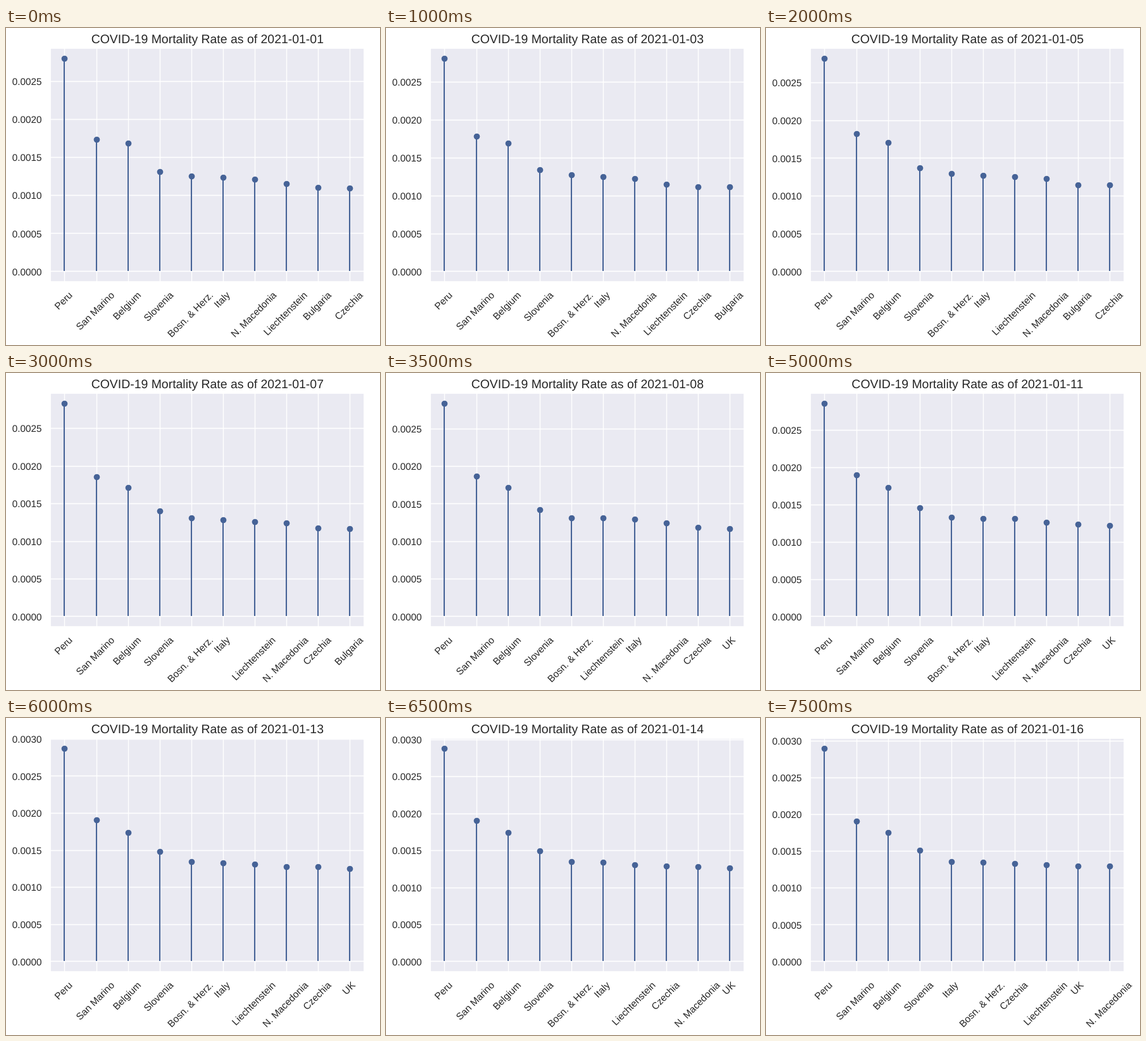
Write an HTML page that moves like this. It is 591 px wide and 501 px high and loops after 8 s.

```html
<!DOCTYPE html>
<html lang="en">
<head>
<meta charset="utf-8">
<title>Mortality rate ranking</title>
<style>
  html, body { margin: 0; width: 100%; height: 100%; overflow: hidden; background: #fff; }
  svg { display: block; }
  text { font: 15.28px "Liberation Sans", Arial, sans-serif; fill: #262626; text-rendering: geometricPrecision; }
  #title { font-size: 19.44px; text-anchor: middle; }
  .tick { text-anchor: end; }
  .name { text-anchor: middle; }
  .grid { stroke: #fff; stroke-width: 1.39; }
  .stem { stroke: #466397; stroke-width: 2.08; }
  .dot { fill: #466397; }
</style>
</head>
<body>
<svg width="591" height="501" viewBox="0 0 591 501">
  <rect x="70" y="32" width="496" height="369" fill="#eaeaf2"/>
  <g id="plot"></g>
  <rect x="70" y="32" width="496" height="369" fill="none" stroke="#fff" stroke-width="1.74"/>
  <g id="marks"></g>
  <g id="labels"></g>
  <text id="title" x="318.3" y="24"></text>
</svg>
<script>
const STEP = 500, DAYS = 16, BARS = 10;
const ZERO = 384.48, SPAN = 336, TOP = 31.73, LABEL_TOP = 414.53;
const LINE_HEIGHT = 14, LABEL_DROP = 6.2;

// Rates are in thousandths; t counts days from the first date
const grow = (start, speed, bend = 0) => t => start + speed * t + bend * t * t;
const bulgaria = grow(1.1018, 0.0118, -0.0003);
const isSunday = t => t % 7 === 2;

const RATES = {
  'Peru': grow(2.794, 0.0042, 0.00015),
  'San Marino': grow(1.734, 0.025, -0.0009),
  'Belgium': grow(1.684, 0.0045),
  'Slovenia': grow(1.31, 0.0165, -0.0002),
  'Bosn. & Herz.': grow(1.2515, 0.0106, -0.00027),
  'Italy': grow(1.235, 0.0079),
  'N. Macedonia': grow(1.21, 0.0048, 0.00006),
  // So small a country that single deaths show as steps
  'Liechtenstein': t => 0.02616 * (t < 4 ? 44 : t < 7 ? 48 : 50),
  // Sunday reports arrive late
  'Bulgaria': t => bulgaria(t) - (isSunday(t) ? 0.01 : 0),
  'Czechia': grow(1.0935, 0.0112, 0.0003),
  'UK': grow(1.0596, 0.0158)
};

const $ = id => document.getElementById(id);
const pen = document.createElement('canvas').getContext('2d');
pen.font = '15.28px "Liberation Sans", Arial, sans-serif';

const columnX = rank => 92.45 + rank * 50.101;
const line = (kind, x1, y1, x2, y2) =>
  `<line class="${kind}" x1="${x1}" y1="${y1}" x2="${x2}" y2="${y2}"/>`;

const ranking = t => Object.entries(RATES)
  .map(([name, rate]) => ({ name, rate: rate(t) }))
  .sort((a, b) => b.rate - a.rate)
  .slice(0, BARS);

function nameLabel(text, x) {
  const y = LABEL_TOP + (pen.measureText(text).width + LINE_HEIGHT) / (2 * Math.SQRT2);
  return `<text class="name" x="-1.2" y="4" transform="translate(${x} ${y}) rotate(-45)">${text.replace('&', '&amp;')}</text>`;
}

function draw(t) {
  const bars = ranking(t);
  const toY = rate => ZERO - SPAN * rate / bars[0].rate;
  let plot = '', marks = '', labels = '';
  for (let rate = 0; toY(rate) >= TOP; rate += 0.5) {
    const y = toY(rate), row = Math.round(y) + 0.5;
    plot += line('grid', 70, row, 566, row);
    labels += `<text class="tick" x="56.4" y="${Math.round(y + LABEL_DROP)}">${(rate / 1000).toFixed(4)}</text>`;
  }
  bars.forEach(({ name, rate }, rank) => {
    const x = Math.round(columnX(rank)), y = Math.round(toY(rate));
    plot += line('grid', x + 0.5, 32, x + 0.5, 401);
    marks += line('stem', x, Math.round(ZERO), x, y) +
      `<circle class="dot" cx="${x + 0.5}" cy="${y + 0.5}" r="4.86"/>`;
    labels += nameLabel(name, columnX(rank));
  });
  $('plot').innerHTML = plot;
  $('marks').innerHTML = marks;
  $('labels').innerHTML = labels;
  $('title').textContent = 'COVID-19 Mortality Rate as of 2021-01-' + String(t + 1).padStart(2, '0');
}

let shown = -1;
const start = performance.now();
function tick() {
  const t = Math.floor((performance.now() - start) / STEP) % DAYS;
  if (t !== shown) draw(shown = t);
  requestAnimationFrame(tick);
}
tick();
</script>
</body>
</html>
```
